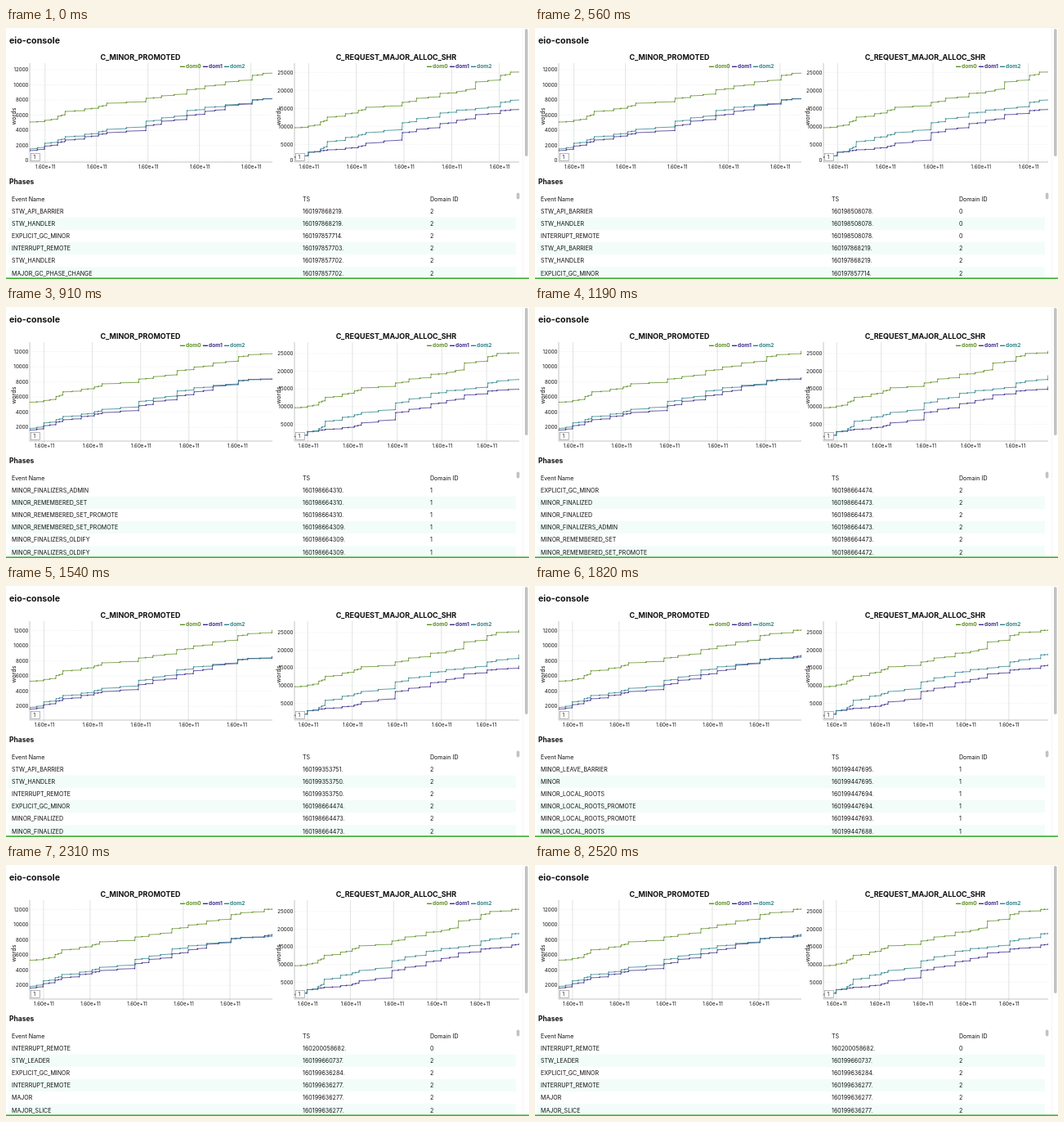
Animation, 640 px wide and 307 px high, one loop 2.66 s. Source, as an HTML page:

```html
<!DOCTYPE html>
<html lang="en">
<head>
<meta charset="utf-8">
<title>eio-console</title>
<style>
html, body { margin: 0; width: 100%; height: 100%; overflow: hidden; background: #fff; }
svg { display: block; width: 640px; height: 307px; font-family: Inter, sans-serif; }
</style>
</head>
<body>
<svg id="stage" viewBox="0 0 640 307"></svg>
<script>
const LOOP = 2660, TOP = 43, BOTTOM = 164, SPAN = 297;
const COLORS = ['#5f8f24', '#3d2b8c', '#2f8289'];

// Burst times shared by all series, in units of SPAN; the lines climb a little between bursts.
const bursts = [0, 18, 34, 43, 67, 84, 94, 142, 161, 192, 214, 239, 272, 285, 317, 328];
const DRIFT = .3;

const minor = {
  title: 'C_MINOR_PROMOTED', left: 29, width: 297, legend: 213, unit: 2000, count: 6,
  labels: [[51, 18.55], [54.5, 18.55]],
  series: [
    [115, 113, 108, 102, 99, 96, 92, 86, 83, 75.5, 71, 66, 58, 55.5, 51.2, 51],
    [150, 144.5, 140, 137, 133, 130, 128, 119.5, 114, 107, 102, 95, 88, 86.5, 84.3, 82],
    [148, 141, 137, 133, 130, 127, 124, 114, 110, 101, 97, 94, 88, 86.8, 85.8, 83]
  ]
};
const major = {
  title: 'C_REQUEST_MAJOR_ALLOC_SHR', left: 353, width: 275, legend: 515, unit: 5000, count: 5,
  labels: [[54.3, 22], [57, 21.6]],
  series: [
    [122, 120, 115, 109, 105, 101, 97, 91, 86, 80, 78, 66, 58, 54, 51.4, 51],
    [158, 152, 150, 149, 147, 145, 141, 128, 124, 117, 113, 106, 101, 100, 96, 94],
    [158, 152, 148, 139, 134, 131, 128, 116, 111, 104, 100.5, 98.5, 91, 88.5, 82, 81]
  ]
};

const barrier = ['STW_API_BARRIER 160197868219 2', 'STW_HANDLER 160197868219 2',
  'EXPLICIT_GC_MINOR 160197857714 2', 'INTERRUPT_REMOTE 160197857703 2',
  'STW_HANDLER 160197857702 2', 'MAJOR_GC_PHASE_CHANGE 160197857702 2'];
const finalized = ['EXPLICIT_GC_MINOR 160198664474 2', 'MINOR_FINALIZED 160198664473 2',
  'MINOR_FINALIZED 160198664473 2', 'MINOR_FINALIZERS_ADMIN 160198664473 2',
  'MINOR_REMEMBERED_SET 160198664473 2', 'MINOR_REMEMBERED_SET_PROMOTE 160198664472 2'];
const leader = ['STW_LEADER 160199660737 2', 'EXPLICIT_GC_MINOR 160199636284 2',
  'INTERRUPT_REMOTE 160199636277 2', 'MAJOR 160199636277 2',
  'MAJOR_SLICE 160199636277 2', 'MAJOR_SLICE 160199636277 2'];

// Start time, horizontal chart scale, table rows with the newest first.
const states = [
  [0, 1, barrier],
  [560, 1, ['STW_API_BARRIER 160198508078 0', 'STW_HANDLER 160198508078 0',
    'INTERRUPT_REMOTE 160198508078 0', ...barrier]],
  [910, .938, ['MINOR_FINALIZERS_ADMIN 160198664310 1', 'MINOR_REMEMBERED_SET 160198664310 1',
    'MINOR_REMEMBERED_SET_PROMOTE 160198664310 1', 'MINOR_REMEMBERED_SET_PROMOTE 160198664309 1',
    'MINOR_FINALIZERS_OLDIFY 160198664309 1', 'MINOR_FINALIZERS_OLDIFY 160198664309 1']],
  [1050, .935, finalized],
  [1540, .935, ['STW_API_BARRIER 160199353751 2', 'STW_HANDLER 160199353750 2',
    'INTERRUPT_REMOTE 160199353750 2', ...finalized]],
  [1820, .905, ['MINOR_LEAVE_BARRIER 160199447695 1', 'MINOR 160199447695 1',
    'MINOR_LOCAL_ROOTS 160199447694 1', 'MINOR_LOCAL_ROOTS_PROMOTE 160199447694 1',
    'MINOR_LOCAL_ROOTS_PROMOTE 160199447693 1', 'MINOR_LOCAL_ROOTS 160199447688 1']],
  [1960, .905, leader],
  [2310, .905, ['INTERRUPT_REMOTE 160200058682 0', ...leader]]
];

const text = (s, x, y, size, attrs = '') =>
  `<text x="${x}" y="${y + size * .36}" font-size="${size}" fill="#111" ${attrs}>${s}</text>`;
const rect = (x, y, w, h, fill, attrs = '') =>
  `<rect x="${x}" y="${y}" width="${w}" height="${h}" fill="${fill}" ${attrs}/>`;
const path = (d, stroke, width, attrs = '') =>
  `<path d="${d}" fill="none" stroke="${stroke}" stroke-width="${width}" ${attrs}/>`;
const bold = 'font-weight="700"', middle = 'text-anchor="middle"', end = 'text-anchor="end"';

// Stairs: a slow drift up to each burst, with one small step halfway, then a jump.
function stairs(ys) {
  const points = [[0, ys[0]]];
  for (let i = 1; i < ys.length; i++) {
    const x0 = bursts[i - 1], x1 = bursts[i], rise = (ys[i] - ys[i - 1]) * DRIFT;
    const mid = (x0 + x1) / 2, y0 = ys[i - 1];
    points.push([mid, y0 + rise * .3], [mid + .5, y0 + rise * .7], [x1, y0 + rise], [x1 + .6, ys[i]]);
  }
  return [...points, [SPAN * 1.2, ys.at(-1)]];
}

function chart({ title, left, width, legend, unit, count, labels, series }, scale) {
  const right = left + width, zoomed = scale < 1;
  const px = x => left + x * scale * width / SPAN;
  const py = y => zoomed ? y + (175 - y) * .024 : y;
  const at = ([x, y]) => px(x).toFixed(2) + ' ' + py(y).toFixed(2);
  let out = text(title, left + width / 2 - 13, 35.5, 9, `${bold} ${middle}`);

  const [first, gap] = labels[+zoomed];
  for (let i = 0; i <= count - zoomed; i++) {
    const y = Math.min(first + gap * i, 162);
    out += path(`M${left} ${y}H${right}`, '#e6e9e6', .5, 'stroke-dasharray="2 1"');
    out += text((count - i) * unit, left - 1.5, y, 6.2, end);
  }
  for (let i = 0; i < 5; i++) {
    const x = px(18.7 + 63 * i);
    out += path(`M${x} ${TOP}V${BOTTOM + 2}`, '#c9d3cc', .6);
    out += text('1.60e+11', x + .5, 170, 6.2, middle);
  }
  out += path(`M${left} ${TOP}V${BOTTOM}H${right}`, '#9a9f9c', .6);

  const clip = `clip${left}`;
  out += `<clipPath id="${clip}">${rect(left, TOP, width, BOTTOM - TOP, '#000')}</clipPath>`;
  out += `<g clip-path="url(#${clip})">`;
  series.forEach((ys, k) => {
    const points = stairs(ys);
    out += path('M' + points.map(at).join('L'), COLORS[k], .75);
    out += path(points.map(p => `M${at(p)}h0`).join(''), COLORS[k], 1.5, 'stroke-linecap="round"');
  });
  out += '</g>';

  COLORS.forEach((color, k) => {
    const x = legend + 27 * k + (k === 1);
    out += path(`M${x} 47.3h6`, color, 1.4);
    out += text('dom' + k, x + 7, 47, 6.6, `${bold} style="fill:${color}"`);
  });
  out += text('words', 0, 0, 7.2, `${middle} transform="translate(${left - 19.5} 108) rotate(-90)"`);
  out += rect(left + 1.5, 153.5, 11, 9, '#fff', 'stroke="#999" stroke-width=".7"');
  return out + text('1', left + 4.5, 158, 6.2);
}

function table(rows) {
  const line = (cells, y) => cells.map((s, i) => text(s, [7, 363, 519][i], y, 7.1)).join('');
  let out = line(['Event Name', 'TS', 'Domain ID'], 209);
  rows.slice(0, 6).forEach((row, i) => {
    const y = 224 + 15.2 * i, [name, ts, domain] = row.split(' ');
    if (i % 2) out += rect(3, y - 7.6, 621, 15.2, '#f2fdfa');
    out += line([name, ts + '.', domain], y);
  });
  return out;
}

function render([, scale, rows]) {
  stage.innerHTML = text('eio-console', 4, 15, 10.7, bold)
    + chart(minor, scale) + chart(major, scale)
    + text('Phases', 4, 188, 8.5, bold) + table(rows)
    + rect(624.8, 201.5, 3.6, 8, '#c2c2c2', 'rx="1.8"')
    + path('M632.5 0V305', '#eee', .6)
    + rect(635, 1, 3.6, 156, '#c2c2c2', 'rx="1.8"')
    + rect(0, 305.4, 640, 1.6, '#3fae35');
}

const stage = document.getElementById('stage');
let shown;
function tick() {
  const t = performance.now() % LOOP;
  const state = states.findLast(s => s[0] <= t);
  if (state !== shown) render(shown = state);
  requestAnimationFrame(tick);
}
tick();
</script>
</body>
</html>
```
